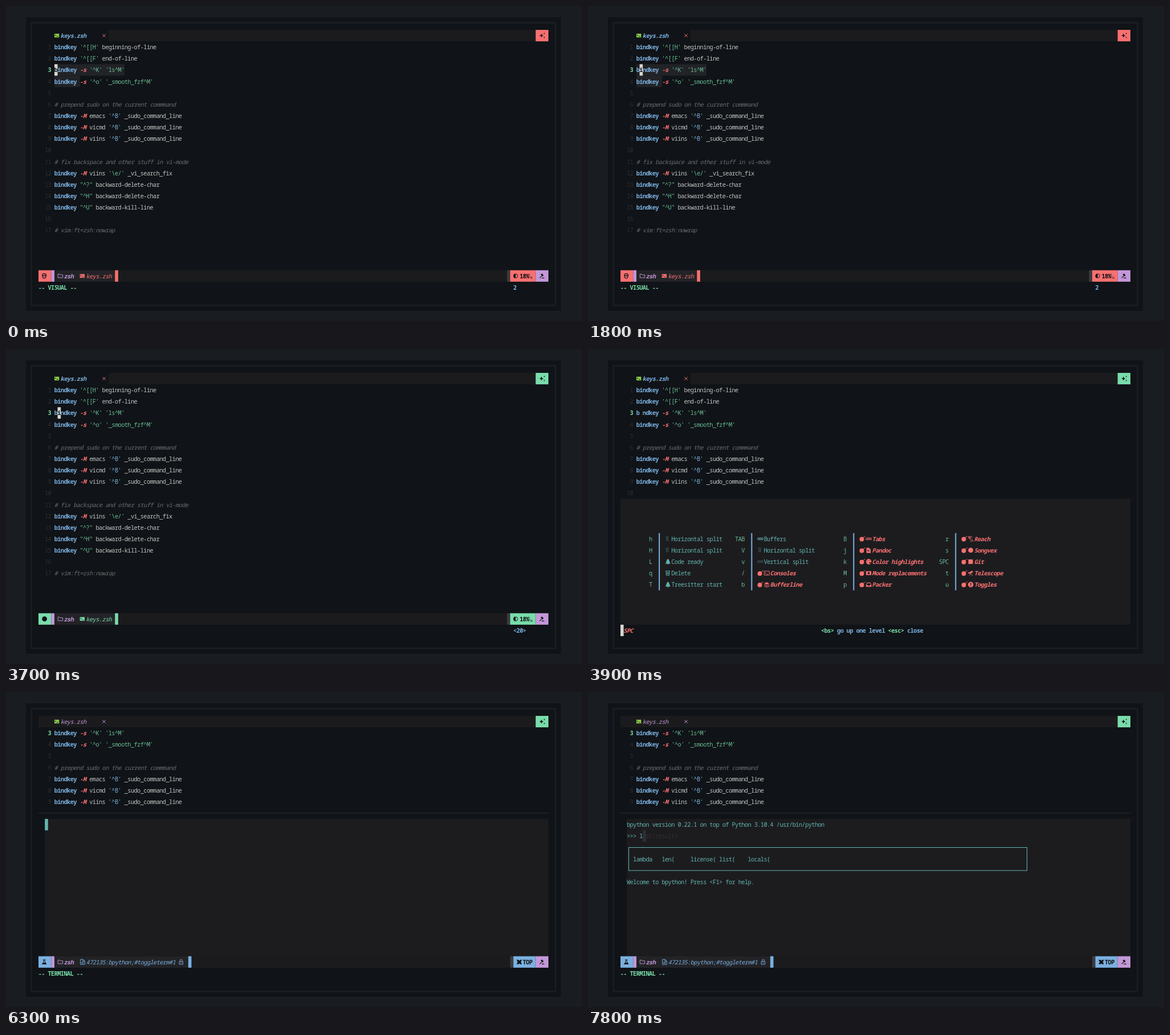
These frames come from a looping animation (1011x554 px, 8000 ms). An HTML page with a canvas:

```html
<!DOCTYPE html>
<html lang="en">
<head>
<meta charset="utf-8">
<title>Editor session</title>
<style>
html, body { margin: 0; width: 100%; height: 100%; overflow: hidden; background: #191d22; }
canvas { display: block; width: 100vw; height: 100vh; }
</style>
</head>
<body>
<canvas id="stage" width="1011" height="554"></canvas>
<script>
const ctx = document.getElementById('stage').getContext('2d');
const LOOP = 8000, LEFT = 57, TOP = 42, CW = 5.594, RH = 20.13, COLS = 160;
const C = {
  outer: '#191d22', bg: '#101317', bar: '#1b1b1d', panel: '#1c1c1f', chip: '#232327', sel: '#212327',
  dim: '#2b2f34', grey: '#6d6d6f', text: '#c3c3c3', red: '#f87070', green: '#79dcaa', blue: '#7ab0df',
  purple: '#c397d8', teal: '#63b5ae', lime: '#89d148', cursor: '#d8d6d2', edge: '#3a3a3f', ghost: '#303034'
};
const x = col => LEFT + col * CW;
const y = row => TOP + row * RH;

const FACE = '"Noto Sans Mono", "DejaVu Sans Mono", monospace';
const fontOf = (style, size) => `${style} extra-condensed ${size}px ${FACE}`;
ctx.font = fontOf('normal', 10);
const SIZE = Math.min(11.3, 62 / ctx.measureText('m').width);

function fill(col, row, cols, color, rows = 1) {
  ctx.fillStyle = color;
  ctx.fillRect(x(col), y(row), cols * CW, rows * RH);
}

// One character per terminal cell.
function text(col, row, str, color, style = 'normal') {
  ctx.font = fontOf(style, SIZE);
  ctx.textAlign = 'center';
  ctx.fillStyle = color;
  [...str].forEach((ch, i) => ch !== ' ' && ctx.fillText(ch, x(col + i + 0.5), y(row) + 14.1));
}

const dots = (xs, ys) => xs.flatMap(a => ys.map(b => `M${a} ${b}h1v1h-1z`)).join('');
const disc = r => `M${5 - r} 5a${r} ${r} 0 1 0 ${2 * r} 0a${r} ${r} 0 1 0 ${-2 * r} 0z`;

// Icons live in a 10 by 10 box: f is filled, s is stroked.
const ICONS = {
  term: { f: 'M0 1.7h8.3v6.6h-8.3zM1.2 3l2 1.6-2 1.6v-1.1l.7-.5-.7-.5zM4 5.8h2.6v.9H4z' },
  shell: { s: 'M.5 1.5h9v7h-9zM2 3.2l1.6 1.6L2 6.4M4.6 6.8h2.6' },
  folder: { s: 'M.7 1.9h3l1 1.2h4.3v5h-8.3z' },
  ranger: { f: 'M0 1.5h4l1 1.2h4v1.2H2L.6 8.5H0zM2.6 4.6H10L8.6 8.7H1.3z' },
  close: { s: 'M1.5 2.2l5.6 5.6M7.1 2.2L1.5 7.8' },
  spark: { f: 'M3.5 1.2l1.1 2.7 2.7 1.1-2.7 1.1-1.1 2.7-1.1-2.7L-.3 5l2.7-1.1zM7.6.6h1.6v1.6H7.6zM7.6 7.6h1.6v1.6H7.6z' },
  tree: { f: 'M5 0l2.8 3H6.5L9 5.8H7.3L10 8.3H5.8V10H4.2V8.3H0l2.7-2.5H1L3.5 3H2.2z' },
  trash: { s: 'M1 1.3h7.5M1.7 1.3l.5 7.5h5l.5-7.5M3.5 4h2.4v2.2H3.5z' },
  rows: { f: dots([2, 4.5], [0.5, 2.7, 4.9, 7.1]) },
  cols: { f: dots([0, 2.2, 4.4, 6.6, 8.4], [3.2, 5.4]) },
  panes: { s: 'M.8 1.3h3.2v3H.8zM5.4 1.3h3.2v3H5.4zM.8 5.8h3.2v3H.8zM5.4 5.8h3.2v3H5.4z' },
  strip: { s: 'M.5 3.5h9v3h-9zM3.5 3.5v3M6.5 3.5v3' },
  bomb: { f: 'M0 5.7a4 4 0 1 0 8 0a4 4 0 1 0 -8 0z', s: 'M6.4 3l1.3-1.6 1.5.2M9.5 0l.7 1' },
  layers: { f: 'M5 .8l4.6 2L5 4.8l-4.6-2zM.4 4.4L5 6.4l4.6-2v1.1L5 7.5.4 5.5zM.4 7L5 9l4.6-2v1.1L5 10 .4 8.1z' },
  doc: { f: 'M1 .7h4.5l3 3v6H1zM2.5 4.4h4v.8h-4zM2.5 6.3h4v.8h-4z' },
  palette: { f: disc(4.8) + dots([2, 4.5, 7], [2.5]) + 'M6 6h3v2H6zM1.7 5h1v1h-1z' },
  frame: { f: 'M.3 1.5h9.2v6.7H.3zM3.2 3.2v3.4h3.4V3.2z' },
  inbox: { f: 'M2 1.5h6L9.8 6v2.8H.2V6zM2.5 2.7L1.3 6h2l.7 1.2h2L6.7 6h2L7.5 2.7z' },
  reach: { s: 'M1 1h5.2l2 2M1 1v1.5h4M1.2 4h4M3 5.8h3l3.5 3.3H4' },
  scope: { f: 'M.2 4.3L7.7.7l1.5 2.8L1.3 6z', s: 'M5 4.4L2.8 9.4M5 4.4l3 5' },
  alert: { f: disc(4.8) + 'M4.2 2.2h1.6v3.2H4.2zM4.2 6.4h1.6v1.4H4.2z' },
  dot: { f: disc(4.4) },
  small: { f: disc(2.4) },
  square: { f: 'M.8 1h8v8h-8z' },
  hash: { s: 'M3.6 1L2.4 9M7.4 1L6.2 9M.8 3.5h8.4M.4 6.5h8.4', w: 1.5 },
  lines: { s: 'M.5 1.5h8.5M.5 4h3M5 4h4M.5 6.3h5M.5 8.7h8.5', w: 1.4 },
  chart: { f: 'M.5 8.3h9v1h-9zM1 7.5V5l2.3-2.4 2 1.8L9.3.8v6.7z' },
  fish: { f: 'M0 2.5l2.4 1.3Q5.5.6 9.4 5Q5.5 9.4 2.4 6.2L0 7.5L1 5z' },
  gauge: { s: 'M9 3.6A4.3 4.3 0 1 1 7.2 1.4M4.6 5.8L9.6.8M3 5l1.6 1.4' },
  book: { s: 'M.8 4.8L5 1.2l4.7 2.6L5.4 7.5zM.8 4.8v1.7l4.5 2.6 4.4-3.7' },
  half: { f: 'M4 1a4 4 0 0 0 0 8z', s: 'M4 1.3a3.7 3.7 0 0 1 0 7.4' },
  head: { s: 'M1 4.2Q1 .8 4.5.8T8 4.2zM1.5 4.2V6Q2 9.3 4.5 9.3T7.5 6V4.2M3 6h1M5.2 6h1', w: 1.2 },
  flask: { f: 'M2.5.7h4.2v1h-.7v2.6l2.8 4.9H.4l2.8-4.9V1.7h-.7zM4.1 2v2.6L3 6.3h3.2L5.1 4.6V2z' },
  gavel: { f: 'M3.2 2.6L5.5.7l3 3.2-2 1.8zM1 8.3l4-4 .8.8-3.9 4zM5 8h4.5v1.3H5z' },
  file: { s: 'M1 .6h4.6l3 2.8v6H1zM5.3.8v2.8h3M2.6 5.3h4M2.6 7.2h4' },
  lock: { s: 'M1 4.4h6.5v4.8H1zM2.4 4.4V2.6q0-1.8 1.9-1.8t1.9 1.8v1.8M4.2 6v1.6' },
  cross: { f: 'M.5 1l3 .2L5 3l1.6-1.8L9 1l-.6 3L7.2 5l1.4 1.4.3 2.8-3-.5L5 7.4 3.4 9 .6 9l.7-3L2.7 5 1 3.8z' }
};
for (const icon of Object.values(ICONS)) {
  if (icon.f) icon.f = new Path2D(icon.f);
  if (icon.s) icon.s = new Path2D(icon.s);
}

function icon(name, col, row, color) {
  const { f, s, w = 0.95 } = ICONS[name];
  ctx.save();
  ctx.translate(x(col), y(row) + 5);
  ctx.fillStyle = ctx.strokeStyle = color;
  ctx.lineWidth = w;
  if (f) ctx.fill(f, 'evenodd');
  if (s) ctx.stroke(s);
  ctx.restore();
}

const CODE = [
  "bindkey '^[[H' beginning-of-line",
  "bindkey '^[[F' end-of-line",
  "bindkey -s '^K' 'ls^M'",
  "bindkey -s '^o' '_smooth_fzf^M'",
  '',
  '# prepend sudo on the current commmand',
  "bindkey -M emacs '^B' _sudo_command_line",
  "bindkey -M vicmd '^B' _sudo_command_line",
  "bindkey -M viins '^B' _sudo_command_line",
  '',
  '# fix backspace and other stuff in vi-mode',
  "bindkey -M viins '\\e/' _vi_search_fix",
  'bindkey "^?" backward-delete-char',
  'bindkey "^H" backward-delete-char',
  'bindkey "^U" backward-kill-line',
  '',
  '# vim:ft=zsh:nowrap'
];

function codeLine(n, row) {
  const current = n === 3;
  text(4 - String(n).length, row, String(n), current ? C.green : C.dim, current ? 'bold' : 'normal');
  for (const m of CODE[n - 1].matchAll(/#.*|^bindkey|-[sM](?= )|'[^']*'|"[^"]*"|\S+/g)) {
    const word = m[0], col = 5 + m.index;
    if (word[0] === '#') text(col, row, word, C.grey, 'italic');
    else if (word === 'bindkey') text(col, row, word, C.blue, 'bold');
    else if (/^-[sM]$/.test(word)) text(col, row, word, C.red, 'italic bold');
    else if (word === "'^B'") {
      text(col, row, "'  '", C.teal);
      text(col + 1, row, '^B', C.blue);
    } else text(col, row, word, /^['"]/.test(word) ? '#69bd94' : C.text);
  }
}

function code(from, to) {
  for (let n = from; n <= to; n++) codeLine(n, n - from + 1);
}

function windowFrame() {
  ctx.fillStyle = C.outer;
  ctx.fillRect(0, 0, 1011, 554);
  ctx.fillStyle = C.bg;
  ctx.fillRect(35, 20, 939, 516);
  ctx.strokeStyle = C.outer;
  ctx.lineWidth = 3;
  ctx.strokeRect(44.5, 29.5, 920, 497);
}

function tabBar(active, accent) {
  const start = active ? 22 : 0;
  fill(start, 0, 156 - start, C.bar);
  icon('term', 5, 0, C.lime);
  text(7, 0, 'keys.zsh', active ? C.blue : C.purple, active ? 'italic bold' : 'italic');
  icon('close', 19.8, 0, active ? C.red : C.purple);
  fill(156, 0, 4, accent);
  icon('spark', 157.2, 0, C.bg);
}

function statusLine({ accent, modeIcon, fileIcon, file, end, posStart, posIcon, pos, posCol }) {
  fill(0, 21, COLS, C.bar);
  fill(0, 21, 4, accent);
  icon(modeIcon, 1, 21, C.bg);
  fill(4, 21, 1, C.purple);
  fill(5, 21, end - 5, C.chip);
  icon('folder', 6, 21, C.purple);
  text(8, 21, 'zsh', C.purple, 'italic bold');
  icon(fileIcon, 13, 21, accent);
  text(15, 21, file, accent, 'italic');
  fill(end, 21, 1, accent);
  fill(posStart - 1, 21, 1, C.edge);
  fill(posStart, 21, 156 - posStart, accent);
  icon(posIcon, posStart + 1, 21, C.bg);
  text(posCol, 21, pos, C.bg, 'bold');
  fill(156, 21, 4, C.purple);
  icon('gavel', 157, 21, C.bg);
}

function fileStatus(visual) {
  statusLine({
    accent: visual ? C.red : C.green, modeIcon: visual ? 'head' : 'dot', fileIcon: 'term',
    file: 'keys.zsh', end: 24, posStart: 148, posIcon: 'half', pos: '18%', posCol: 151
  });
  ctx.font = fontOf('normal', 6);
  ctx.fillStyle = C.bg;
  ctx.fillText('L', x(154) + 1, y(21) + 10);
  ctx.fillText('N', x(154) + 3.5, y(21) + 15);
}

function editor({ visual, cursor = 1, message = visual, cmd = '', accent = C.red }) {
  tabBar(true, accent);
  if (visual) {
    fill(5, 3, 22, C.sel);
    fill(5, 4, 8, C.sel);
  }
  code(1, 17);
  fill(5 + cursor, 3, 1, C.cursor);
  text(5 + cursor, 3, 'bindkey'[cursor], C.bg, 'bold');
  fileStatus(visual);
  if (message) text(0, 22, '-- VISUAL --', C.green, 'bold');
  text(149, 22, cmd, C.blue, 'bold');
}

// Entries are "key icon label"; a leading + marks a group.
const MAIN_MENU = [
  { key: 9, bar: 12, items: ['h rows Horizontal split', 'H rows Horizontal split', 'L tree Code ready', 'q trash Delete', 'T tree Treesitter start'] },
  { key: 38, bar: 41, items: ['TAB strip Buffers', 'V rows Horizontal split', 'v cols Vertical split', '/ +shell Consoles', 'b +layers Bufferline'] },
  { key: 70, bar: 73, items: ['B +strip Tabs', 'j +doc Pandoc', 'k +palette Color highlights', 'M +frame Mode replacements', 'p +inbox Packer'] },
  { key: 102, bar: 105, items: ['r +reach Reach', 's +dot Songvex', 'SPC +square Git', 't +scope Telescope', 'u +alert Toggles'] }
];
const CONSOLE_MENU = [
  { key: 7, bar: 10, items: ['b square BPython', 'c dot BluetoothCTL', 'f lines Float', 'g small GroovySh'] },
  { key: 27, bar: 30, items: ['h panes Horizontal', 'i hash Sh', 'j dot JShell', 'k hash Bash'] },
  { key: 50, bar: 53, items: ['l dot Lua', 'm dot Hilbish', 'n small Node', 'p dot Python'] },
  { key: 73, bar: 76, items: ['r ranger Ranger', 't chart Btop', 'v panes Vertical', 'x fish Fish'] },
  { key: 96, bar: 99, items: ['y square PyPy', 'z gauge Zsh'] }
];

function menuItem(item, col, keyCol, row) {
  const [key, mark, ...label] = item.split(' ');
  const group = mark[0] === '+';
  const color = group ? C.red : C.teal;
  text(keyCol + 1 - key.length, row, key, '#69bd94');
  if (group) {
    icon('bomb', col, row, color);
    col += 2;
  }
  icon(mark.replace('+', ''), col, row, color);
  text(col + 2, row, label.join(' '), color, group ? 'italic bold' : 'normal');
}

function menu(columns, top, nested) {
  tabBar(true, C.green);
  code(1, top - 1);
  fill(6, 3, 1, C.bg);
  fill(0, top, COLS, C.panel, 22 - top);
  for (const { key, bar, items } of columns) {
    ctx.fillStyle = C.blue;
    ctx.fillRect(x(bar), y(top + 3), 2, items.length * RH);
    items.forEach((item, i) => menuItem(item, bar + 2, key, top + 3 + i));
  }
  fill(0, 22, 1, C.cursor);
  text(1, 22, 'SPC', C.red, 'italic bold');
  if (nested) {
    icon('book', 5, 22, C.blue);
    icon('bomb', 8, 22, C.red);
    icon('shell', 10, 22, C.red);
    text(12, 22, 'Consoles', C.red, 'italic bold');
  }
  text(63, 22, '<bs>', C.green, 'bold');
  text(68, 22, 'go up one level', C.blue, 'bold');
  text(84, 22, '<esc>', C.green, 'bold');
  text(90, 22, 'close', C.blue, 'bold');
}

function completion() {
  fill(7, 10, 1, '#2f2f33');
  text(6, 10, 'l', C.teal);
  text(7, 10, 'ist(result)', C.ghost);
  ctx.strokeStyle = C.teal;
  ctx.lineWidth = 1;
  ctx.strokeRect(71.5, 273.5, 699, 40.5);
  ['lambda', 'len(', 'license(', 'list(', 'locals('].forEach((word, i) => text(4 + 9 * i, 12, word, C.teal));
}

function terminal(step) {
  tabBar(false, C.green);
  code(3, 9);
  ctx.fillStyle = '#1d2125';
  ctx.fillRect(LEFT, 212, COLS * CW, 2);
  fill(2, 9, 158, C.panel, 12);
  if (step > 0) text(2, 9, 'bpython version 0.22.1 on top of Python 3.10.4 /usr/bin/python', C.teal);
  if (step === 0) fill(2, 9, 1, C.teal);
  if (step === 1) fill(2, 10, 1, C.teal);
  if (step > 1) {
    text(2, 10, '>>>', C.teal);
    if (step === 3) completion();
    else fill(6, 10, 1, '#2f2f33');
    text(2, step === 3 ? 14 : 11, 'Welcome to bpython! Press <F1> for help.', C.teal);
  }
  statusLine({
    accent: C.blue, modeIcon: 'flask', fileIcon: 'file', file: '472135:bpython;#toggleterm#1',
    end: 47, posStart: 149, posIcon: 'cross', pos: 'TOP', posCol: 152
  });
  icon('lock', 44, 21, C.blue);
  text(0, 22, '-- TERMINAL --', C.green, 'bold');
}

const SCENES = [
  [0, () => editor({ visual: true, cursor: 0, cmd: '2' })],
  [1200, () => editor({ visual: true, cursor: 0, cmd: '<20>' })],
  [1500, () => editor({ visual: true, cursor: 0, cmd: '<20>^[', message: false })],
  [1800, () => editor({ visual: true, cmd: '2' })],
  [3000, () => editor({ visual: false })],
  [3700, () => editor({ visual: false, cmd: '<20>', accent: C.green })],
  [3900, () => menu(MAIN_MENU, 11, false)],
  [4000, () => menu(CONSOLE_MENU, 12, true)],
  [6300, () => terminal(0)],
  [6400, () => terminal(1)],
  [6500, () => terminal(2)],
  [7800, () => terminal(3)]
];

const start = performance.now();
function frame() {
  const t = (performance.now() - start) % LOOP;
  windowFrame();
  SCENES.findLast(([from]) => t >= from)[1]();
  requestAnimationFrame(frame);
}
frame();
</script>
</body>
</html>
```
